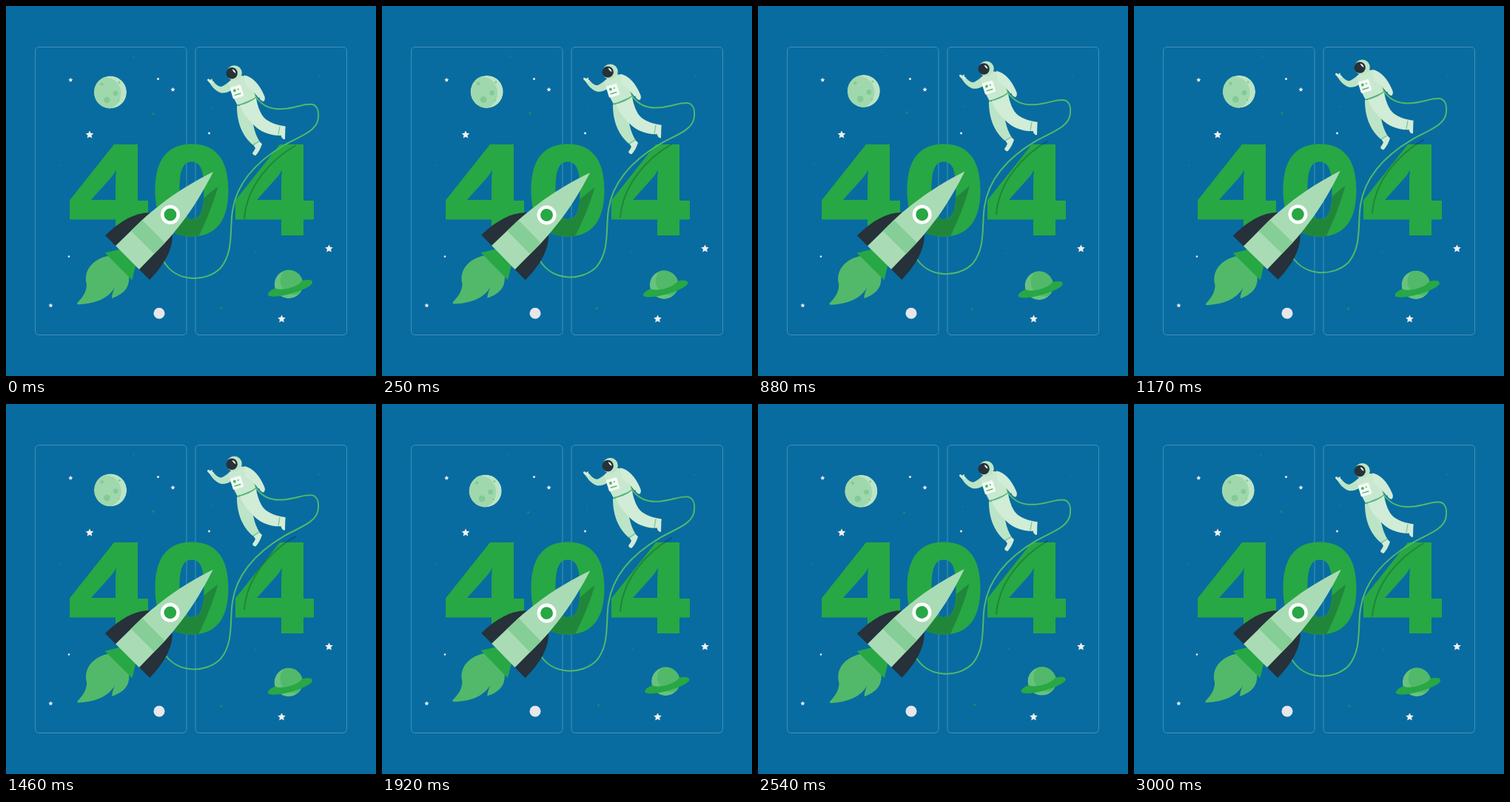
Write an HTML page that moves like this. It is 500 px wide and 500 px high and loops after 3.04 s.

```html
<!DOCTYPE html>
<html lang="en">
<head>
<meta charset="utf-8">
<title>404</title>
<style>
  html, body { margin: 0; height: 100%; overflow: hidden; background: #086ca0; }
  svg { display: block; width: 100vw; height: 100vh; }
  .pale { fill: #d1ecd7; }
  .mint { fill: #a9dcb5; }
  .soft { fill: #bce4c6; }
  .suit { fill: #c8e9d0; }
  .leaf { fill: #52b96a; }
  .green { fill: #28a745; }
  .deep { fill: #20873a; }
  .dark { fill: #263139; }
  .line { fill: none; stroke: #52b96a; stroke-width: 2; stroke-linecap: round; }
  .shadow { stroke: #000; opacity: .2; }
</style>
</head>
<body>
<svg viewBox="0 0 500 500" role="img" aria-label="404">
  <defs>
    <path id="four" fill-rule="evenodd" d="M146 187H178V263H192V288.500H178V310H148V288.500H86V262.500ZM149 221Q147 226 141 233L115 262H148V240Q148 230 149 221Z"/>
    <path id="zero" fill-rule="evenodd" d="M251 186.500C284 186.500 300.500 208 300.500 249S284 311.500 251 311.500S201.500 290 201.500 249S218 186.500 251 186.500ZM251 210.500C239 210.500 234.500 222 234.500 249S239 288 251 288S267.500 276 267.500 249S263 210.500 251 210.500Z"/>
    <clipPath id="inZero"><use href="#zero" clip-rule="evenodd"/></clipPath>
    <clipPath id="inMoon"><circle cx="141" cy="116.500" r="22"/></clipPath>
    <clipPath id="inPlanet"><circle cx="382" cy="376" r="19.300"/></clipPath>
  </defs>

  <g fill="none" stroke="#468fb8" stroke-width="1">
    <rect x="39.500" y="55.500" width="204.500" height="389" rx="5"/>
    <rect x="256" y="55.500" width="204.500" height="389" rx="5"/>
  </g>

  <g id="stars" fill="#f2eff2">
    <circle cx="205.500" cy="98.500" r="1.500"/>
    <circle cx="274.500" cy="172" r="1.400"/>
    <circle cx="85" cy="338.500" r="1.300"/>
    <circle cx="207" cy="415.300" r="7.500" fill="#e8e6ea"/>
  </g>

  <g id="moon">
    <g class="green" opacity=".5">
      <circle cx="172" cy="69" r="1"/>
      <circle cx="199" cy="145.500" r="1.700"/>
      <circle cx="423" cy="95" r="1"/>
      <circle cx="278" cy="137" r="1"/>
      <circle cx="73.500" cy="215.500" r="1"/>
    </g>
    <g clip-path="url(#inMoon)">
      <circle class="soft" cx="141" cy="116.500" r="22"/>
      <circle cx="133.500" cy="118" r="22" fill="#a0d8ae"/>
      <g fill="#84ca97">
        <circle cx="136.300" cy="127" r="4.400"/>
        <circle cx="148" cy="118" r="3.400"/>
        <circle cx="129.500" cy="105.500" r="2.300"/>
        <circle cx="153" cy="103.500" r="1.500"/>
        <circle cx="152" cy="128" r="1.200"/>
      </g>
    </g>
  </g>

  <g id="planet">
    <g class="green" opacity=".5">
      <circle cx="337" cy="332" r="1"/>
      <circle cx="291" cy="408" r="1.700"/>
    </g>
    <g clip-path="url(#inPlanet)">
      <circle cx="382" cy="376" r="19.300" fill="#68c27d"/>
      <circle class="leaf" cx="390" cy="371" r="19.300"/>
    </g>
    <path class="green" d="M363.500 381.500C356 384.500 352 389 355 391.500C366 397 417 381 414 373C413 369 406 370 400.500 371C396 378 376 386 363.500 381.500Z"/>
  </g>

  <g class="green">
    <use href="#four"/>
    <use href="#zero"/>
    <use href="#four" x="224"/>
  </g>
  <g clip-path="url(#inZero)">
    <path id="shade" class="deep" d="M286.500 244C262 262 238 288 222 300L214 320H256C268 296 279 272 286.500 244Z"/>
  </g>

  <g id="walker">
    <path class="line shadow" d="M391 188.500C358 208 326 242 322 287"/>
    <path class="line" d="M337 122C347 136 358 140 374 139C392 138 404 131 414 133C422 135 423 145 421.500 154C418 170 397 176 376 188C342 208 312 237 306 277C302 304 308 332 290 354C270 374 230 374 213 345"/>
    <path fill="#44b05f" d="M327 104L338 119L336 126L328 124Z"/>
    <path class="soft" d="M312 135C312 155 318 175 334 188L342.500 183C335 170 332 156 332 133Z"/>
    <path class="pale" d="M334.500 188L342.500 183L346 186.500C344 193 341 198 337.500 202C333 201.500 332 198.500 335 196L337 192Z"/>
    <path class="pale" d="M316 134L338 124C340 136 344 147 351 153C359 159 368 161 377.500 162.500L376 174.500C360 176.500 345 171 336 162C327 153 320 146 316 134Z"/>
    <path class="pale" d="M369 163L377.500 163L377 180C373.500 180.500 372 177 371.500 174L368 173Z"/>
    <path d="M370 162.500L368 174M334 187.500L342.500 182.500" fill="none" stroke="#7dc991" stroke-width="1.300"/>
    <path class="soft" d="M280 102C284 106 287 109 291 109C296 107 300 103 304 101L307 112C302 116 296 118 291 117.500C285 116 280 111 276.500 106Z"/>
    <path class="pale" d="M277 106L272 100.500C272 98 274 98 276 100L278.500 98L279 101L281.500 103Z"/>
    <path class="suit" d="M300 104C304 98 316 92 324 95C330 104 335 114 337.500 124L313 134.500C308 126 304 115 300 104Z"/>
    <path class="pale" d="M322 93.500C334 96 343 107 348.500 120L341 124C337 118 331 112 324 108Z"/>
    <path class="pale" d="M342 121.500L348 119.500C350.500 123 350.500 127 348 129C344 128 342 125 342 121.500Z"/>
    <path d="M313 134Q327 132 337.500 123.500" fill="none" stroke="#52b96a" stroke-width="1.500"/>
    <g transform="translate(312 116) rotate(-17)">
      <rect x="-7.500" y="-8" width="15" height="16" rx="1.500" fill="#f4faf5"/>
      <circle class="leaf" cx="-2.500" cy="-2.500" r="2"/>
      <circle class="leaf" cx="2.800" cy="-2.800" r="1"/>
      <path d="M-4.500 3.500H4.500" stroke="#52b96a" stroke-width="1.500"/>
    </g>
    <circle class="soft" cx="308.500" cy="90.500" r="10.300"/>
    <circle class="dark" cx="305.200" cy="90.800" r="7.700"/>
    <path d="M305.500 85.500Q310 86 310.500 91Q307 89.500 305.500 85.500Z" fill="#f4faf5"/>
  </g>

  <g id="rocket">
    <path class="leaf" d="M141 337C117 341 104 358 109 376C109 387 103 394 96.500 401C95.500 403 97 403.500 99 403.300C120 402 138 396 147 380C145 385 143 390 143 395C157 390 168 382 166 364Z"/>
    <g transform="translate(222 282) rotate(45)">
      <path class="green" d="M-15 81H15L26 99H-26Z"/>
      <path id="fin" class="dark" d="M-21 17C-35 30-42 52-42.500 82H-20Z"/>
      <use href="#fin" transform="scale(-1 1)"/>
      <path class="mint" d="M0-82C-8-58-16-28-19 0C-20.500 12-21.500 22-21.800 32L-22.500 82H22.500L21.800 32C21.500 22 20.500 12 19 0C16-28 8-58 0-82Z"/>
      <path d="M-21.800 32H21.800L22.100 53H-22.100Z" fill="#85ce97"/>
      <circle r="13" fill="#fff"/>
      <circle class="green" r="8.400"/>
    </g>
  </g>
</svg>
<script>
  const LOOP = 3040;
  const $ = id => document.getElementById(id);
  const move = (id, value) => $(id).setAttribute('transform', value);

  // Five-pointed star as an SVG path
  function star(x, y, r) {
    const points = Array.from({ length: 10 }, (_, i) => {
      const a = i * Math.PI / 5 - Math.PI / 2, d = i % 2 ? r * 0.48 : r;
      return `${x + d * Math.cos(a)} ${y + d * Math.sin(a)}`;
    });
    return `<path d="M${points.join('L')}Z"/>`;
  }

  $('stars').insertAdjacentHTML('beforeend', [
    [87.3, 100, 3.2], [225.5, 113, 3.2], [60.4, 404.7, 3.2],
    [113, 174, 5.6], [436.5, 328, 5.6], [372.5, 423, 5.6]
  ].map(s => star(...s)).join(''));

  function draw() {
    const p = performance.now() % LOOP / LOOP;
    const wave = Math.sin(p * 2 * Math.PI);
    const sway = Math.asin(wave) * 2 / Math.PI;
    const lift = 10 * (1 - Math.abs(1 - 2 * p));
    const tilt = `rotate(${0.7 * Math.sin(p * 4 * Math.PI)} 175 330)`;

    move('moon', `translate(${2.3 * sway} ${-1.8 * sway})`);
    move('planet', `translate(${-2.6 * sway} ${2.2 * sway})`);
    move('walker', `translate(0 ${-lift})`);
    move('rocket', tilt);
    move('shade', tilt);
    requestAnimationFrame(draw);
  }
  draw();
</script>
</body>
</html>
```
